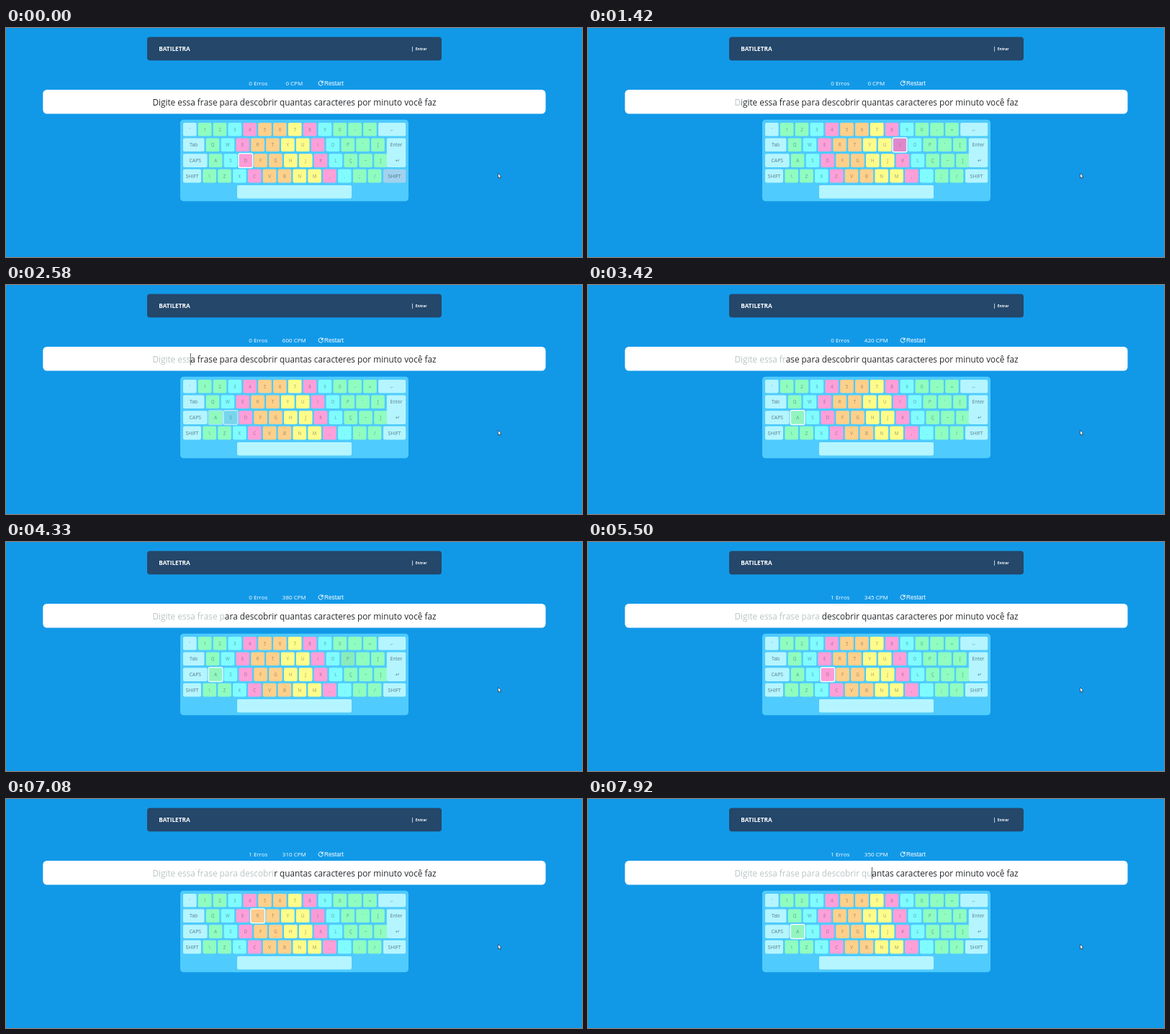
These frames come from a looping animation (800x319 px, 8000 ms). An HTML page:

```html
<!DOCTYPE html>
<html lang="pt">
<head>
<meta charset="utf-8">
<title>Teste de digitação</title>
<style>
  html, body { margin: 0; width: 100%; height: 100%; overflow: hidden; background: #1199e8; }
  svg { display: block; width: 100vw; height: 100vh; font-family: "Open Sans", "Noto Sans", sans-serif; }
  text { white-space: pre; }
  .mid { text-anchor: middle; }
  .count { font-size: 8px; fill: #fff; }
  .phrase { font-size: 11.8px; font-kerning: none; font-variant-ligatures: none; }
  .label { font-size: 6.2px; fill: #2f5060; fill-opacity: .52; }
  .wide { font-size: 6.9px; fill-opacity: .72; }
  .restart { font: 8.4px "Liberation Sans", Arial, sans-serif; fill: #fff; }
</style>
</head>
<body>
<svg id="stage" viewBox="0 0 800 319">
  <rect width="800" height="319" fill="#1199e8"/>
  <rect x="196" y="12.5" width="409" height="32.8" rx="4" fill="#24476a"/>
  <text x="212.3" y="32.4" font-size="8.3" font-weight="700" fill="#fff">BATILETRA</text>
  <rect x="564" y="25.8" width=".9" height="7" fill="#fff" opacity=".8"/>
  <text x="568.8" y="31.4" font-size="5" font-weight="700" fill="#fff">Entrar</text>

  <text id="errors" class="count mid" x="350.3" y="79.8"></text>
  <text id="cpm" class="count mid" x="400.3" y="79.8"></text>
  <path d="M439.3 74.7A3.1 3.1 0 1 0 440.2 77.6" fill="none" stroke="#fff" stroke-width="1"/>
  <path d="M440.5 73.1V76.4H437.2Z" fill="#fff"/>
  <text class="restart" x="441.9" y="79.8">Restart</text>

  <rect x="51.3" y="86" width="698.2" height="33.5" rx="5.5" fill="#fff"/>
  <text id="phrase" class="phrase mid" x="400.5" y="107.7"></text>
  <rect id="caret" y="95" width=".9" height="16.4" fill="#222"/>

  <rect x="242" y="127.8" width="317" height="113.4" rx="4.5" fill="#4fcbfd"/>
  <g id="keys"></g>
  <path d="M683.5 202.3V209L685 207.7L686.1 210.1L687.2 209.6L686.1 207.3H688Z" fill="#fff" stroke="#123" stroke-width=".6"/>
</svg>
<script>
const LOOP = 8000;
const PHRASE = 'Digite essa frase para descobrir quantas caracteres por minuto você faz';
const PRESSES = [
  1000, 1380, 1550, 1690, 1820, 1940, 2050,
  2190, 2350, 2500, 2700, 2870,
  3060, 3250, 3480, 3640, 3830, 4000,
  4200, 4380, 4560, 5050, 5260,
  5600, 5780, 5960, 6140, 6320, 6480, 6850, 6930, 7160, 7350,
  7560, 7740
];
const ERROR_AT = 4800;
const DARK = [38, 42, 46], FADED = [186, 197, 197];
const COLORS = { g: '#8ffcc0', c: '#80fcff', p: '#ff9fd9', o: '#ffd08a', y: '#fffc8a', l: '#b5f5ff' };
// start x, top, labels, finger colours
const ROWS = [
  [246, 132, "'1234567890-=", 'lggcpooypcggg'],
  [277.8, 153.5, 'QWERTYUIOP´[', 'gcpooyypcggg'],
  [281.8, 175.3, 'ASDFGHJKLÇ~]', 'gcpooyypcggg'],
  [273.4, 196.8, '\\ZXCVBNM,.;/', 'ggcpooyypcgg']
];
const PITCH = 20.85, SIZE = 18.6;

const $ = id => document.getElementById(id);
const clamp = v => Math.min(1, Math.max(0, v));
const ramp = (t, from, to) => clamp((t - from) / (to - from));

function add(parent, tag, attrs, text) {
  const el = document.createElementNS('http://www.w3.org/2000/svg', tag);
  for (const name in attrs) el.setAttribute(name, attrs[name]);
  if (text !== undefined) el.textContent = text;
  return parent.appendChild(el);
}

const keys = {};
function addKey(id, x, y, w, h, color, label, wide) {
  const g = add($('keys'), 'g', {});
  const box = { x, y, width: w, height: h, rx: 1.8 };
  add(g, 'rect', { ...box, fill: COLORS[color] });
  const shade = add(g, 'rect', { ...box, fill: '#40289a', opacity: 0 });
  const ring = add(g, 'rect', {
    x: x - .6, y: y - .6, width: w + 1.2, height: h + 1.2, rx: 2.2,
    fill: '#ff2080', 'fill-opacity': .03, stroke: '#f4ffff', 'stroke-width': 1.5, opacity: 0
  });
  add(g, 'text', { class: 'label mid' + (wide ? ' wide' : ''), x: x + w / 2, y: y + 11.7 }, label);
  keys[id] = { shade, ring };
}

for (const [x, y, labels, fingers] of ROWS) {
  [...labels].forEach((c, i) => addKey(c, x + i * PITCH, y, SIZE, SIZE, fingers[i], c));
}
addKey('back', 517.2, 132, 38, SIZE, 'l', '←', true);
addKey('tab', 246, 153.5, 29.4, SIZE, 'l', 'Tab', true);
addKey('enter', 528.8, 153.5, 26.4, 40.4, 'l', 'Enter', true);
addKey('caps', 246, 175.3, 33.6, SIZE, 'l', 'CAPS', true);
addKey('shiftL', 246, 196.8, 25, SIZE, 'l', 'SHIFT', true);
addKey('shiftR', 524, 196.8, 31.2, SIZE, 'l', 'SHIFT', true);
addKey(' ', 321, 219, 159, 18.4, 'l', '');
add($('keys'), 'text', { class: 'label wide mid', x: 544, y: 186.5 }, '↵');

const chars = [...PHRASE].map(c => add($('phrase'), 'tspan', {}, c));
const keyOf = i => PHRASE[i].toUpperCase();

function mix(a, b, k) {
  return `rgb(${a.map((v, i) => Math.round(v + (b[i] - v) * k))})`;
}

function draw(t) {
  const typed = PRESSES.filter(p => p <= t).length;
  const ring = {}, shade = {};
  const raise = (map, id, v) => { map[id] = Math.max(map[id] || 0, v); };

  for (let i = 0; i <= PRESSES.length; i++) {
    const shown = i ? ramp(t, PRESSES[i - 1] + 40, PRESSES[i - 1] + 140) : 1;
    const gone = i < PRESSES.length ? ramp(t, PRESSES[i] + 50, PRESSES[i] + 130) : 0;
    raise(ring, keyOf(i), shown * (1 - gone));
    if (i < PRESSES.length) {
      const p = PRESSES[i];
      raise(shade, keyOf(i), ramp(t, p - 10, p + 20) * (1 - ramp(t, p + 80, p + 170)));
    }
  }
  shade.shiftR = 1 - ramp(t, PRESSES[0] + 20, PRESSES[0] + 150);

  for (const id in keys) {
    keys[id].ring.setAttribute('opacity', ring[id] || 0);
    keys[id].shade.setAttribute('opacity', .17 * (shade[id] || 0));
  }
  chars.forEach((el, i) => {
    const k = i < PRESSES.length ? ramp(t, PRESSES[i], PRESSES[i] + 80) : 0;
    el.setAttribute('fill', mix(DARK, FADED, k));
  });

  const seconds = Math.floor((t - PRESSES[0]) / 1000);
  $('cpm').textContent = (seconds > 0 ? Math.round(typed * 60 / seconds) : 0) + ' CPM';
  $('errors').textContent = (t >= ERROR_AT ? 1 : 0) + ' Erros';

  const blinkOn = t > 500 && (t + 460) % 1000 < 500;
  $('caret').setAttribute('x', $('phrase').getStartPositionOfChar(typed).x - .4);
  $('caret').setAttribute('opacity', blinkOn ? .85 : 0);
}

const start = performance.now();
function tick() {
  draw((performance.now() - start) % LOOP);
  requestAnimationFrame(tick);
}
tick();
</script>
</body>
</html>
```
